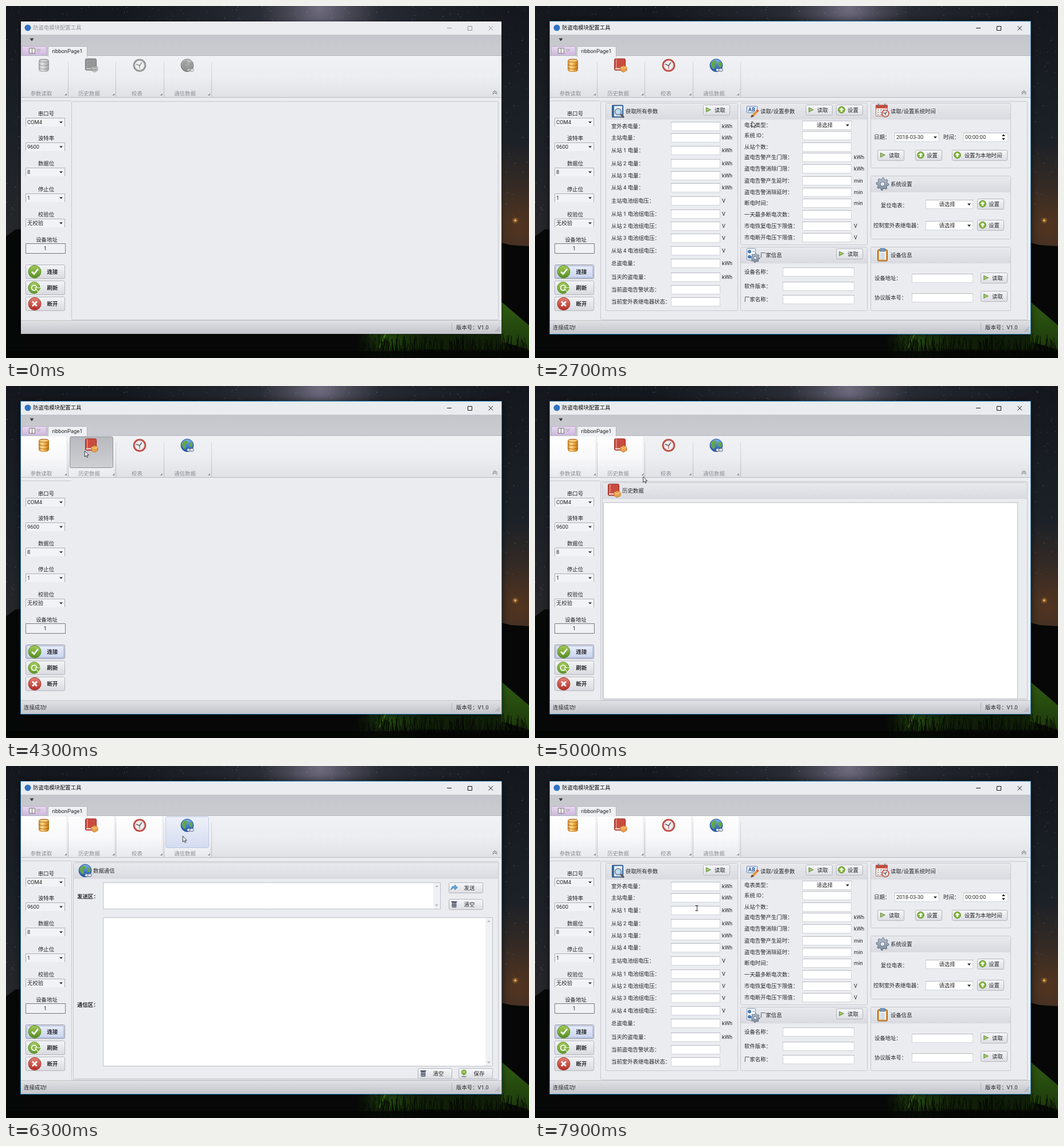
These frames come from a looping animation (912x614 px, 8000 ms). An HTML page with a canvas:

```html
<!DOCTYPE html>
<html lang="zh-CN">
<head>
<meta charset="utf-8">
<style>
html, body { margin: 0; width: 100%; height: 100%; overflow: hidden; background: #050606; }
canvas { display: block; }
</style>
</head>
<body>
<canvas id="stage" width="912" height="614"></canvas>
<script>
const W = 912, H = 614, LOOP = 8000;
const stage = document.getElementById('stage').getContext('2d');
let c = stage;
const FONT = '9.4px Roboto, "Noto Sans CJK SC", "Noto Sans CJK", sans-serif';
const BG = '#ebecf0', INK = '#26262a', LINE = '#c6c8ce';

function grad(y0, y1, ...cols) {
  const g = c.createLinearGradient(0, y0, 0, y1);
  cols.forEach((k, i) => g.addColorStop(i / (cols.length - 1), k));
  return g;
}
function glow(x, y, r, rgb, a) {
  const g = c.createRadialGradient(x, y, 0, x, y, r);
  g.addColorStop(0, `rgba(${rgb},${a})`);
  g.addColorStop(.5, `rgba(${rgb},${a * .4})`);
  g.addColorStop(1, `rgba(${rgb},0)`);
  c.fillStyle = g;
  c.fillRect(x - r, y - r, 2 * r, 2 * r);
}
function rect(x, y, w, h, col) { c.fillStyle = col; c.fillRect(x, y, w, h); }
function box(x, y, w, h, fill, stroke, r = 0) {
  c.beginPath();
  c.roundRect(x + .5, y + .5, w - 1, h - 1, r);
  if (fill) { c.fillStyle = fill; c.fill(); }
  if (stroke) { c.strokeStyle = stroke; c.lineWidth = 1; c.stroke(); }
}
function poly(pts, fill, stroke, width = 1, open) {
  c.beginPath();
  for (let i = 0; i < pts.length; i += 2) c.lineTo(pts[i], pts[i + 1]);
  if (!open) c.closePath();
  if (fill) { c.fillStyle = fill; c.fill(); }
  if (stroke) { c.strokeStyle = stroke; c.lineWidth = width; c.stroke(); }
}
const stroke = (pts, col, width) => poly(pts, null, col, width, true);
function disc(x, y, r, fill, edge, width = 1) {
  c.beginPath();
  c.arc(x, y, r, 0, 7);
  if (fill) { c.fillStyle = fill; c.fill(); }
  if (edge) { c.strokeStyle = edge; c.lineWidth = width; c.stroke(); }
}
function text(s, x, y, col = INK, align = 'left', bold) {
  c.font = (bold ? '600 ' : '') + FONT;
  c.textAlign = align;
  c.textBaseline = 'middle';
  c.fillStyle = col;
  c.fillText(s, x, y + .5);
}
const down = (x, y, col = '#222') => poly([x - 3, y - 1.5, x + 3, y - 1.5, x, y + 2], col);

// ---- desktop ----
function desktop() {
  const cv = document.createElement('canvas');
  cv.width = W; cv.height = H;
  c = cv.getContext('2d');
  rect(0, 0, W, H, grad(0, 430, '#14171d', '#1b2027', '#28282b'));
  glow(540, 0, 340, '92,94,108', .45);
  glow(548, 4, 105, '150,142,168', .6);
  glow(895, 385, 150, '112,62,24', .6);
  let seed = 7;
  const rnd = () => (seed = seed * 16807 % 2147483647) / 2147483647;
  for (let i = 0; i < 3200; i++) {
    const x = rnd() * W, y = rnd() * 370, a = rnd() ** 3;
    rect(x, y, 1, 1, `rgba(210,215,230,${a * .6})`);
  }
  glow(888, 374, 6, '255,173,67', .8);
  disc(888, 374, 1.3, '#ffc46a');
  poly([0, 402, 16, 390, 40, 388, 40, 614, 0, 614], '#060707');
  poly([30, 560, 600, 566, 860, 412, 880, 417, 912, 419, 912, 614, 30, 614], '#060706');
  poly([864, 516, 912, 557, 912, 600, 864, 585], grad(516, 600, '#305c12', '#1c380b'));
  glow(670, 582, 60, '48,98,18', .75);
  poly([632, 572, 864, 572, 880, 600, 646, 598], 'rgba(30,62,10,.45)');
  stroke([662, 572, 650, 598], '#487d1a', 2);
  for (let i = 0; i < 260; i++) {
    const x = 615 + rnd() * 297, y = 614 - rnd() * 12;
    stroke([x, y, x + rnd() * 12 - 6, y - 8 - rnd() * 25], i % 5 ? '#060a05' : '#10190b', 1);
  }
  rect(0, 602, W, 12, 'rgba(3,5,3,.8)');
  c = stage;
  return cv;
}
const sky = desktop();

// ---- icons, drawn around x, y ----
const icons = {
  db(x, y) {
    const body = c.createLinearGradient(x - 9, 0, x + 9, 0);
    ['#d98a24', '#ffdf94', '#eea63a', '#b9701a'].forEach((k, i) => body.addColorStop(i / 3, k));
    box(x - 9, y - 11, 18, 22, body, '#b9741b', 4);
    for (let i = 0; i < 3; i++) {
      c.beginPath();
      c.ellipse(x, y - 8 + i * 6, 8.5, 2.5, 0, 0, i ? Math.PI : 7);
      if (!i) { c.fillStyle = '#f8cd7c'; c.fill(); }
      c.strokeStyle = '#a9651a'; c.lineWidth = 1; c.stroke();
    }
  },
  book(x, y) {
    box(x - 11, y - 12, 20, 21, '#c94b40', '#97291f', 2);
    rect(x - 8, y - 11, 1.5, 16, '#e89187');
    rect(x - 9, y + 5, 16, 2, '#f5e8e2');
    poly([x, y + 3, x + 6, y, x + 11, y + 3, x + 11, y + 9, x + 5, y + 12, x, y + 9], '#eba24a', '#ad6a1c', .8);
    stroke([x, y + 3, x + 5, y + 5.5, x + 11, y + 3], '#ffdb9d');
  },
  clock(x, y, r = 10) {
    disc(x, y, r, '#eceef0', '#bf4a42', r * .27);
    disc(x, y, r * .82, null, '#dba09b', .8);
    stroke([x - r * .6, y - r * .2, x, y + r * .05, x + r * .4, y - r * .5], '#666', 1.6);
    stroke([x, y, x, y + r * .6], '#a33', 1);
  },
  globe(x, y) {
    disc(x, y, 11, grad(y - 11, y + 11, '#7db3ee', '#1c50a8'), '#234f8e');
    poly([x - 8, y - 6, x - 2, y - 9, x + 1, y - 5, x - 3, y - 1, x - 2, y + 4, x - 5, y + 7, x - 9, y], '#63a845');
    poly([x + 3, y - 5, x + 9, y - 5, x + 9, y + 3, x + 4, y + 2], '#63a845');
    box(x - 1, y + 5, 7, 6, '#dce3ef', '#5f6d85', 2.5);
    box(x + 4, y + 5, 8, 6, '#dce3ef', '#5f6d85', 2.5);
  },
  search(x, y) {
    box(x - 10, y - 11, 20, 22, '#3c6ea3', '#294d78', 1);
    rect(x - 6, y - 9, 14, 18, '#e8eff6');
    stroke([x + 5, y + 5, x + 11, y + 11], '#555', 3);
    disc(x + 1, y + 1, 5.5, '#bcdcf2', '#6c7c8d', 1.5);
  },
  edit(x, y) {
    box(x - 10, y - 9, 19, 12, '#f6f9ff', '#4775b5', 1);
    text('AB', x - 1, y - 3, '#234f94', 'center', true);
    stroke([x + 10, y - 2, x + 1, y + 8], '#e49736', 4);
    poly([x - 3, y + 11, x - 1, y + 6, x + 3, y + 9], '#5b3d24');
    stroke([x + 10, y - 2, x + 8, y], '#d55353', 4);
  },
  calendar(x, y) {
    box(x - 12, y - 11, 21, 20, '#f7f5f2', '#b5665a', 1);
    rect(x - 12, y - 11, 21, 6, '#c9483b');
    for (let i = 0; i < 9; i++) rect(x - 9 + i % 3 * 5, y - 3 + (i / 3 | 0) * 4, 3, 2, '#a9aaad');
    rect(x - 8, y - 13, 2, 5, '#777'); rect(x + 3, y - 13, 2, 5, '#777');
    icons.clock(x + 5, y + 4, 6);
  },
  gear(x, y, r = 11) {
    const p = [];
    for (let i = 0; i < 32; i++) {
      const a = i * Math.PI / 16, q = i % 4 < 2 ? r : r * .76;
      p.push(x + q * Math.cos(a), y + q * Math.sin(a));
    }
    poly(p, grad(y - r, y + r, '#b9c4d1', '#77879a'), '#617184');
    disc(x, y, r * .34, BG, '#617184');
  },
  maker(x, y) {
    box(x - 10, y - 12, 16, 21, '#f5f7fa', '#7990ad', 1);
    disc(x - 5, y - 6, 3, '#4779b5');
    disc(x - 5, y + 3, 3, '#4779b5');
    rect(x, y - 7, 4, 1.5, '#9aa7b8');
    icons.gear(x + 5, y + 5, 8);
  },
  clip(x, y) {
    box(x - 9, y - 10, 18, 21, '#d9923d', '#995916', 2);
    rect(x - 6, y - 7, 12, 15, '#f6f9fc');
    for (let i = 0; i < 4; i++) rect(x - 4, y - 3 + i * 3, 8, 1, '#8aa5c2');
    box(x - 5, y - 12, 10, 6, '#7d9bbd', '#47678c', 1);
  },
  play(x, y) { poly([x - 4, y - 4, x + 4, y, x - 4, y + 4], '#98c45f', '#6b8f4a', .9); },
  up(x, y) {
    disc(x, y, 5.8, '#82b838', '#5d8a2a');
    poly([x, y - 4, x + 4, y, x + 1.5, y, x + 1.5, y + 3.5, x - 1.5, y + 3.5, x - 1.5, y, x - 4, y], '#fff');
  },
  send(x, y) {
    poly([x - 6, y + 4, x - 3, y - 2, x + 1, y - 2, x + 1, y - 5, x + 6, y, x + 1, y + 4, x + 1, y + 1, x - 2, y + 1], '#68a8db', '#3a75aa', .8);
  },
  bin(x, y) {
    box(x - 4, y - 3, 8, 9, '#a4a8b6', '#505666', 1);
    rect(x - 5, y - 5, 10, 2, '#505666');
    for (let i = -2; i < 3; i += 2) rect(x + i - .5, y - 1, 1, 5, '#505666');
  },
  save(x, y) {
    disc(x, y - 2, 4, '#9acb57', '#588726');
    poly([x - 4, y, x + 4, y, x, y + 4], '#6fa630');
    rect(x - 4, y + 5, 8, 1.5, '#777');
  },
  ok(x, y) {
    disc(x, y, 11, grad(y - 11, y + 11, '#a3cb58', '#558c22'), '#5b8f2b');
    stroke([x - 5, y, x - 1, y + 4, x + 6, y - 5], '#fff', 2.6);
  },
  redo(x, y) {
    disc(x - 1, y, 10, grad(y - 10, y + 10, '#a3cb58', '#5f9729'), '#5b8f2b');
    disc(x - 1, y, 4.5, '#8fbb4c', '#f2f7ea', 2);
    poly([x + 1, y, x + 12, y, x + 6.5, y + 8], '#7fae3d', '#f2f7ea', 1.2);
  },
  no(x, y) {
    disc(x, y, 11, grad(y - 11, y + 11, '#e58478', '#b32a22'), '#a83a31');
    stroke([x - 4, y - 4, x + 4, y + 4], '#fff', 3);
    stroke([x + 4, y - 4, x - 4, y + 4], '#fff', 3);
  }
};

// ---- controls ----
function button(x, y, w, icon, label, h = 19) {
  box(x, y, w, h, grad(y, y + h, '#f7f8fa', '#dcdde3'), '#b3b5bc', 2);
  icons[icon](x + 9.5, y + h / 2 - .5);
  text(label, x + 6 + w / 2, y + h / 2, INK, 'center');
}
function input(x, cy, w) {
  box(x, cy - 8, w, 16, '#fff', '#d2d4d9');
  rect(x, cy - 8, w, 1, '#b8bac0');
}
function combo(x, cy, w, label, center) {
  input(x, cy, w);
  text(label, center ? x + w / 2 - 4 : x + 3, cy, INK, center ? 'center' : 'left');
  down(x + w - 7, cy);
}
function panel(x, y, w, h, icon, title) {
  box(x, y, w, h, BG, LINE, 2);
  rect(x + 1, y + 1, w - 2, 28, grad(y, y + 28, '#e9eaee', '#dadbe1'));
  icons[icon](x + 21, y + 14.5);
  text(title, x + 35, y + 15);
}

// ---- pages ----
const rows1 = [
  ['室外表电量', 210], ['主站电量', 230], ['从站 1 电量', 252], ['从站 2 电量', 275], ['从站 3 电量', 296],
  ['从站 4 电量', 317], ['主站电池组电压', 340], ['从站 1 电池组电压', 363], ['从站 2 电池组电压', 384],
  ['从站 3 电池组电压', 405], ['从站 4 电池组电压', 427], ['总盗电量', 449], ['当天的盗电量', 473],
  ['当前盗电告警状态', 495], ['当前室外表继电器状态', 516]];
const rows2 = [
  ['系统 ID', 226], ['从站个数', 246], ['盗电告警产生门限', 264, 'kWh'], ['盗电告警消除门限', 284, 'kWh'],
  ['盗电告警产生延时', 305, 'min'], ['盗电告警消除延时', 325, 'min'], ['断电时间', 344, 'min'],
  ['一天最多断电次数', 364], ['市电恢复电压下限值', 384, 'V'], ['市电断开电压下限值', 404, 'V']];

function deviceInfo(full) {
  panel(585, 420, 245, 112, 'clip', '设备信息');
  if (full) text('设备地址：', 592, 475);
  text('协议版本号：', 592, 509);
  input(657, 475, 107); input(657, 509, 107);
  button(777, 465, 47, 'play', '读取'); button(777, 497, 47, 'play', '读取');
}
function rightColumn() {
  panel(585, 169, 245, 114, 'calendar', '读取/设置系统时间');
  text('日期：', 591, 229); combo(627, 229, 78, '2018-03-30');
  text('时间：', 712, 229); input(747, 229, 78); text('00:00:00', 750, 229);
  down(817, 232); poly([814, 227, 820, 227, 817, 223.5], '#222');
  button(597, 251, 47, 'play', '读取');
  button(663, 251, 47, 'up', '设置');
  button(727, 251, 97, 'up', '设置为本地时间');
  panel(585, 296, 245, 111, 'gear', '系统设置');
  text('复位电表：', 603, 348); combo(681, 346, 83, '请选择', true);
  text('控制室外表继电器：', 590, 383); combo(681, 383, 83, '请选择', true);
  button(771, 336, 47, 'up', '设置'); button(771, 373, 47, 'up', '设置');
  deviceInfo(true);
}
function leftColumns() {
  panel(123, 169, 231, 363, 'search', '获取所有参数');
  button(293, 172, 47, 'play', '读取');
  rows1.forEach(([s, y], i) => {
    text(s + '：', 133, y);
    input(237, y, 86);
    if (i < 13) text(i > 5 && i < 11 ? 'V' : 'kWh', 326, y);
  });
  panel(358, 169, 222, 248, 'edit', '读取/设置参数');
  button(472, 172, 47, 'play', '读取'); button(525, 172, 47, 'up', '设置');
  text('电表类型：', 365, 208); combo(466, 208, 86, '请选择', true);
  rows2.forEach(([s, y, unit]) => {
    text(s + '：', 365, y);
    input(466, y, 86);
    if (unit) text(unit, 556, y);
  });
  panel(358, 420, 222, 112, 'maker', '厂家信息');
  button(525, 423, 47, 'play', '读取');
  ['设备名称：', '软件版本：', '厂家名称：'].forEach((s, i) => {
    const y = [464, 489, 512][i];
    text(s, 365, y); input(432, y, 125);
  });
}
function area(x, y, w, h) {
  box(x, y, w, h, '#fff', '#bcbec4');
  rect(x + w - 13, y + 1, 12, h - 2, '#f0f1f4');
  down(x + w - 7, y + h - 7, '#b4b6bc');
  poly([x + w - 10, y + 8, x + w - 4, y + 8, x + w - 7, y + 5], '#b4b6bc');
}
const frame = () => box(114, 166, 745, 382, BG, LINE, 2);
const pages = {
  clear() {},
  empty: frame,
  partial() { frame(); text('系统 ID：', 365, 227); deviceInfo(false); },
  right() { frame(); rightColumn(); },
  params() { frame(); leftColumns(); rightColumn(); },
  history() {
    frame();
    panel(117, 168, 742, 378, 'book', '历史数据');
    box(119, 203, 723, 343, '#fff', '#bcbec4');
  },
  wipe() {
    box(119, 530, 723, 16, '#fff', '#bcbec4');
    rect(117, 528, 730, 8, BG);
    rect(858, 167, 1, 379, LINE);
  },
  meter() {
    frame();
    panel(117, 168, 742, 378, 'clock', '校表');
    input(238, 330, 166); input(238, 411, 145); input(479, 411, 145); input(553, 490, 123);
  },
  comm() {
    frame();
    panel(117, 168, 742, 378, 'globe', '数据通信');
    text('发送区：', 124, 228, INK, 'left', true);
    text('通信区：', 124, 417, INK, 'left', true);
    area(169, 203, 589, 47); area(169, 264, 680, 260);
    button(772, 203, 60, 'send', '发送'); button(772, 232, 60, 'bin', '清空');
    button(718, 527, 60, 'bin', '清空'); button(789, 527, 60, 'save', '保存');
  }
};
const schedule = [[0, 'empty'], [1900, 'partial'], [2100, 'params'], [4300, 'clear'], [4400, 'history'],
  [5500, 'wipe'], [5600, 'meter'], [6200, 'clear'], [6300, 'comm'], [7400, 'clear'], [7500, 'right'], [7600, 'params']];

// ---- pointer ----
const path = [
  [100, 664, 197], [300, 664, 197], [1000, 74, 488], [1200, 64, 472], [2000, 64, 472], [2700, 378, 201],
  [2900, 486, 298], [3100, 414, 265], [3300, 414, 265], [3900, 66, 115], [4200, 137, 113], [4300, 137, 113],
  [4400, 146, 118], [4500, 146, 118], [4700, 157, 127], [4800, 157, 127], [5100, 204, 173], [5200, 204, 173],
  [5300, 194, 162], [5400, 194, 162], [5500, 236, 115], [5800, 236, 115], [6200, 308, 122], [6300, 308, 122],
  [6500, 298, 127], [6600, 298, 127], [7200, 66, 118], [7500, 66, 118], [7900, 282, 248]];
function pointer(t) {
  const i = path.findIndex(p => p[0] >= t);
  if (i < 1) return path[0].slice(1);
  const [t0, x0, y0] = path[i - 1], [t1, x1, y1] = path[i], k = (t - t0) / (t1 - t0);
  return [x0 + (x1 - x0) * k, y0 + (y1 - y0) * k];
}
function drawPointer(t, x, y) {
  if (t < 100) return;
  const beam = t === 2900 || t >= 7900;
  if (beam) {
    stroke([x - 2.5, y - 4.5, x + 2.5, y - 4.5], '#333');
    stroke([x + .5, y - 5, x + .5, y + 5], '#333');
    stroke([x - 2.5, y + 4.5, x + 2.5, y + 4.5], '#333');
    return;
  }
  const p = [0, 0, 0, 10, 2.3, 8, 3.9, 11.4, 5.4, 10.7, 3.9, 7.5, 7, 7.3];
  poly(p.map((v, i) => v + (i % 2 ? y : x) + .3), '#fff', '#222', .9);
}

// ---- window ----
const groups = [['参数读取', 'db', 3600, 7400], ['历史数据', 'book', 4000, 4300],
  ['校表', 'clock', 5100, 5500], ['通信数据', 'globe', 6000, 6200]];

function ribbon(t, mx, my) {
  rect(26, 50, 838, 37, grad(50, 87, '#c5c6cb', '#cbccd1'));
  down(45, 59); rect(42, 56, 6, 1, '#444');
  box(28, 70, 43, 17, grad(70, 87, '#e9d9f0', '#cdb5dd'), '#bda9cb', 2);
  box(40, 73, 11, 10, '#f4f0f6', '#777'); rect(45, 73, 1, 10, '#777');
  poly([54, 76, 60, 76, 57, 79.5], '#eee', '#888', .8);
  rect(26, 87, 838, 73, grad(87, 160, '#f0f1f4', '#eceef1', '#e0e1e6'));
  rect(26, 86, 838, 1, '#b3b5bb');
  box(73, 70, 69, 20, '#eff0f3', '#b3b5bb', 2);
  rect(74, 87, 67, 4, '#eff0f3');
  text('ribbonPage1', 107, 78.5, INK, 'center');
  groups.forEach(([name, icon, lit, press], i) => {
    const gx = 26 + 83.3 * i, bx = Math.round(gx + 2);
    if (t >= lit) rect(Math.round(gx), 88, 79, 71, grad(88, 159, '#fefefe', '#f9f9fb', '#e8e9ed'));
    const pressed = t >= press && t < press + 100;
    const over = t > 3300 && mx >= bx && mx < bx + 76 && my > 88 && my < 144;
    if (pressed) box(bx, 88, 76, 55, grad(88, 143, '#b8b9be', '#cfd0d4'), '#8b8d94', 2);
    else if (over) box(bx, 88, 76, 55, grad(88, 143, '#eef1f9', '#d3dcf0'), '#b9c4dc', 2);
    c.save();
    if (t < 2100) c.filter = 'grayscale(1) opacity(.65)';
    icons[icon](Math.round(66 + 83.3 * i), 103.5);
    c.restore();
    text(name, 61.5 + 83.5 * i, 153, '#8d8f95', 'center');
    poly([106, 152, 106, 156, 102, 156].map((v, k) => k % 2 ? v : v + 83.3 * i), '#8f9197');
    rect(Math.round(gx + 82), 98, 1, 60, grad(98, 158, '#d9dade', '#b5b7bd'));
  });
  rect(26, 159, 838, 1, '#b7b9bf');
  stroke([848.5, 151, 852.5, 148, 856.5, 151], '#55575c');
  stroke([848.5, 154, 852.5, 151, 856.5, 154], '#55575c');
}

function sidebar(t, mx, my) {
  rect(26, 165, 88, 1, LINE);
  [['串口号', 'COM4', 203], ['波特率', '9600', 246], ['数据位', '8', 290],
   ['停止位', '1', 335], ['校验位', '无校验', 379]].forEach(([label, value, y]) => {
    text(label, 70, y - 15, INK, 'center');
    rect(34, y - 8, 69, 15, '#f2f3f6');
    stroke([34.5, y + 7, 34.5, y - 7.5, 102.5, y - 7.5, 102.5, y + 7], '#aeb0b6');
    text(value, 37, y);
    poly([93, y - 1.5, 99, y - 1.5, 96, y + 1.5], '#222');
  });
  text('设备地址', 71, 408, INK, 'center');
  box(34, 414, 70, 18, '#f0f1f4', '#77797f');
  text('1', 68.5, 423, INK, 'center');
  [['ok', '连接', 451], ['redo', '刷新', 479], ['no', '断开', 507]].forEach(([icon, label, y], i) => {
    const over = t > 300 && t < 2100 && mx > 34 && mx < 102 && my >= y && my < y + 25;
    const focus = i === 0 && t >= 1300;
    const fill = over ? grad(y, y + 25, '#d3d5dc', '#e3e4ea') : focus ? grad(y, y + 25, '#e9eefb', '#c8d3ee') : grad(y, y + 25, '#f4f5f7', '#d9dae0');
    box(34, y, 69, 25, fill, over || focus ? '#8f929c' : '#b3b5bc', 2);
    if (over || focus) box(36, y + 2, 65, 21, null, over ? '#777e92' : '#a7b3d1');
    icons[icon](50, y + 12.5);
    text(label, 81, y + 12.5, INK, 'center', true);
  });
}

function draw(t) {
  const active = t >= 1300, [mx, my] = pointer(t);
  c.drawImage(sky, 0, 0);
  c.save();
  c.shadowColor = active ? 'rgba(0,0,0,.7)' : 'rgba(0,0,0,.35)';
  c.shadowBlur = active ? 12 : 6;
  rect(26, 27, 838, 545, BG);
  c.restore();
  disc(38, 38, 5.5, '#2f73c4');
  const ink = active ? '#111' : '#929398';
  text('防盗电模块配置工具', 47, 38, ink);
  stroke([769, 38.5, 777, 38.5], ink);
  box(805, 35, 8, 8, null, ink);
  stroke([841.5, 35, 849, 42.5], ink);
  stroke([849, 35, 841.5, 42.5], ink);
  ribbon(t, mx, my);
  sidebar(t, mx, my);
  pages[schedule.filter(s => s[0] <= t).pop()[1]]();
  rect(26, 548, 838, 24, grad(548, 572, '#e1e2e6', '#d2d3d8', '#c4c5cb'));
  rect(26, 548, 838, 1, '#c3c5ca');
  if (t >= 1800) text('连接成功!', 31, 561);
  rect(777, 553, 1, 14, '#b0b2b8');
  text('版本号：V1.0', 785, 561);
  for (let i = 0; i < 3; i++) stroke([861, 560 + i * 3, 853 + i * 3, 568], '#8f9197', .8);
  if (active) box(25, 26, 840, 547, null, '#2377ad');
  drawPointer(t, mx, my);
}

function tick() {
  draw(Math.floor(performance.now() % LOOP / 100) * 100);
  requestAnimationFrame(tick);
}
tick();
</script>
</body>
</html>
```
